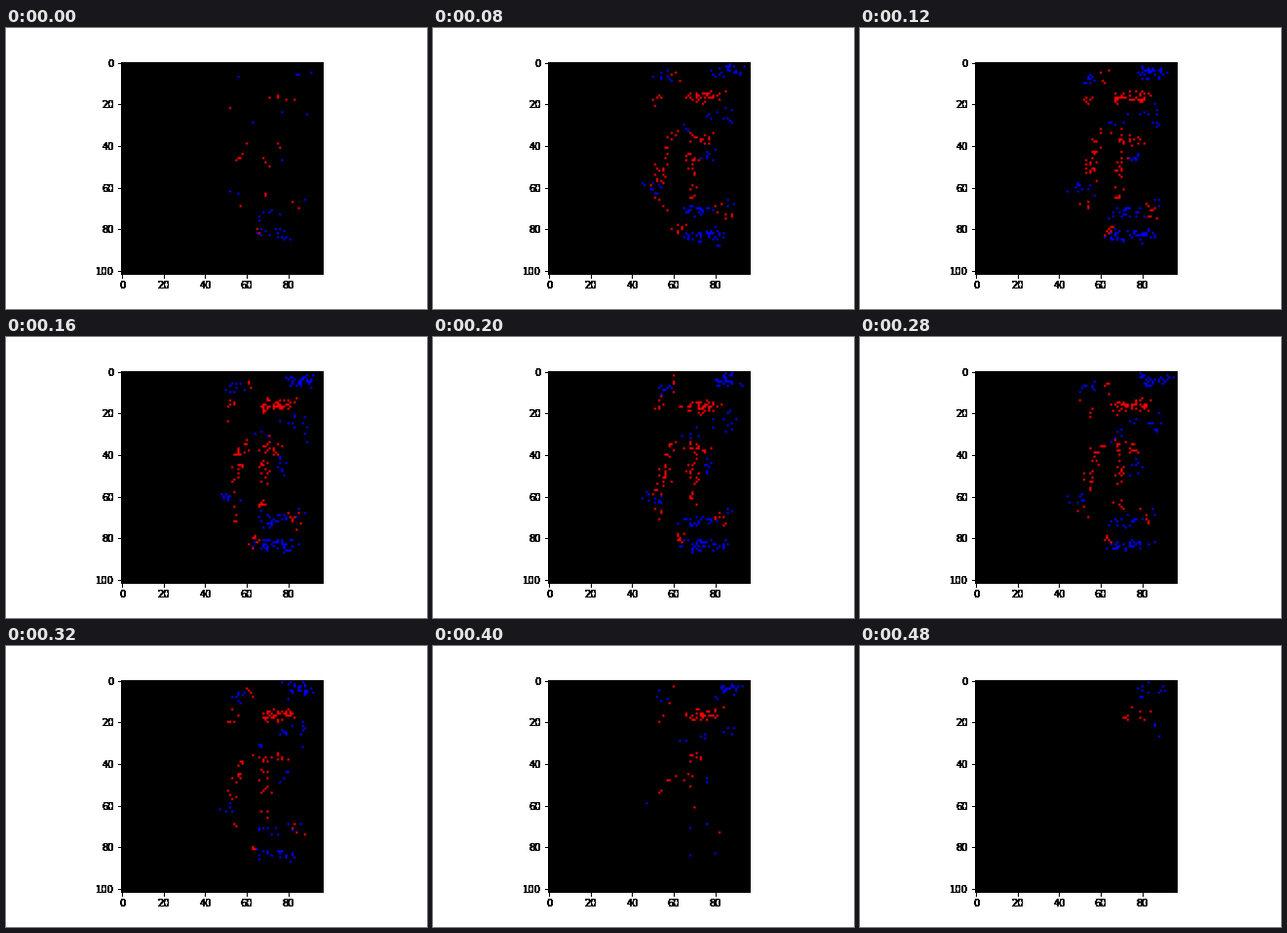
Write a matplotlib script that moves like this. It is 432 px wide and 288 px high and loops after 520 ms.

```python
import numpy as np
import matplotlib.pyplot as plt
from matplotlib.animation import FuncAnimation

W, H = 97, 102          # sensor grid
FRAMES, INTERVAL = 13, 40
JITTER = 1.6            # spread of events around their stroke
LAST = (84, 10)         # the spot where activity dies out last

# Strokes that fire events: x0, y0, x1, y1, events at full activity
RED = [
    (67, 17, 82, 16, 42), (53, 14, 53, 22, 6), (62, 4, 62, 10, 4),
    (67, 36, 78, 38, 17), (69, 43, 69, 53, 16), (59, 34, 53, 58, 27),
    (69, 61, 69, 66, 7), (52, 66, 56, 70, 4), (80, 68, 86, 74, 8),
    (62, 79, 64, 82, 7),
]
BLUE = [
    (79, 5, 92, 4, 32), (51, 8, 59, 7, 10), (86, 21, 87, 31, 7),
    (72, 26, 84, 23, 5), (65, 30, 67, 31, 4), (77, 43, 77, 48, 8),
    (46, 59, 54, 63, 10), (65, 72, 79, 71, 22), (64, 83, 85, 83, 42),
    (85, 66, 87, 68, 3),
]


def activity(x, y, frame):
    """Share of events firing: starts low in the view, ends near LAST."""
    rise = 0.1 + 0.35 * (y / H) ** 2 + frame / 3
    distance = np.hypot(x - LAST[0], y - LAST[1])
    end = 10.2 + 3.6 * np.exp(-(distance / 35) ** 2)
    return np.clip(min(rise, (end - frame) / 5), 0, 1)


def scatter(img, rng, strokes, frame, color):
    for x0, y0, x1, y1, full in strokes:
        share = activity((x0 + x1) / 2, (y0 + y1) / 2, frame)
        n = round(full * share)
        t = rng.random(n)
        x = x0 + (x1 - x0) * t + rng.normal(0, JITTER, n)
        y = y0 + (y1 - y0) * t + rng.normal(0, JITTER, n)
        cols = np.clip(np.rint(x), 0, W - 1).astype(int)
        rows = np.clip(np.rint(y), 0, H - 1).astype(int)
        img[rows, cols] = color


def event_image(frame):
    rng = np.random.default_rng(100 + frame)
    img = np.zeros((H, W, 3))
    scatter(img, rng, BLUE, frame, (0, 0, 1))
    scatter(img, rng, RED, frame, (1, 0, 0))
    return img


def add_axes():
    ax = fig.add_subplot(111, facecolor="none")
    ax.set(xlim=(-0.5, W - 0.5), ylim=(H - 0.5, -0.5), aspect="equal",
           xticks=range(0, 81, 20), yticks=range(0, 101, 20))
    return ax


plt.rcParams.update({"font.family": "DejaVu Sans", "font.size": 10})
fig = plt.figure(figsize=(6, 4), dpi=72, facecolor="white")
fig.subplots_adjust(left=0.125, right=0.9, bottom=0.125, top=0.88)

# Stacked axes turn the soft edges of the tick labels solid black.
layers = [add_axes() for _ in range(24)]
picture = layers[0].imshow(event_image(0), interpolation="hanning")


def update(frame):
    picture.set_data(event_image(frame))
    return [picture]


anim = FuncAnimation(fig, update, frames=FRAMES, interval=INTERVAL,
                     repeat=True, repeat_delay=0, blit=False)
plt.show()
```
